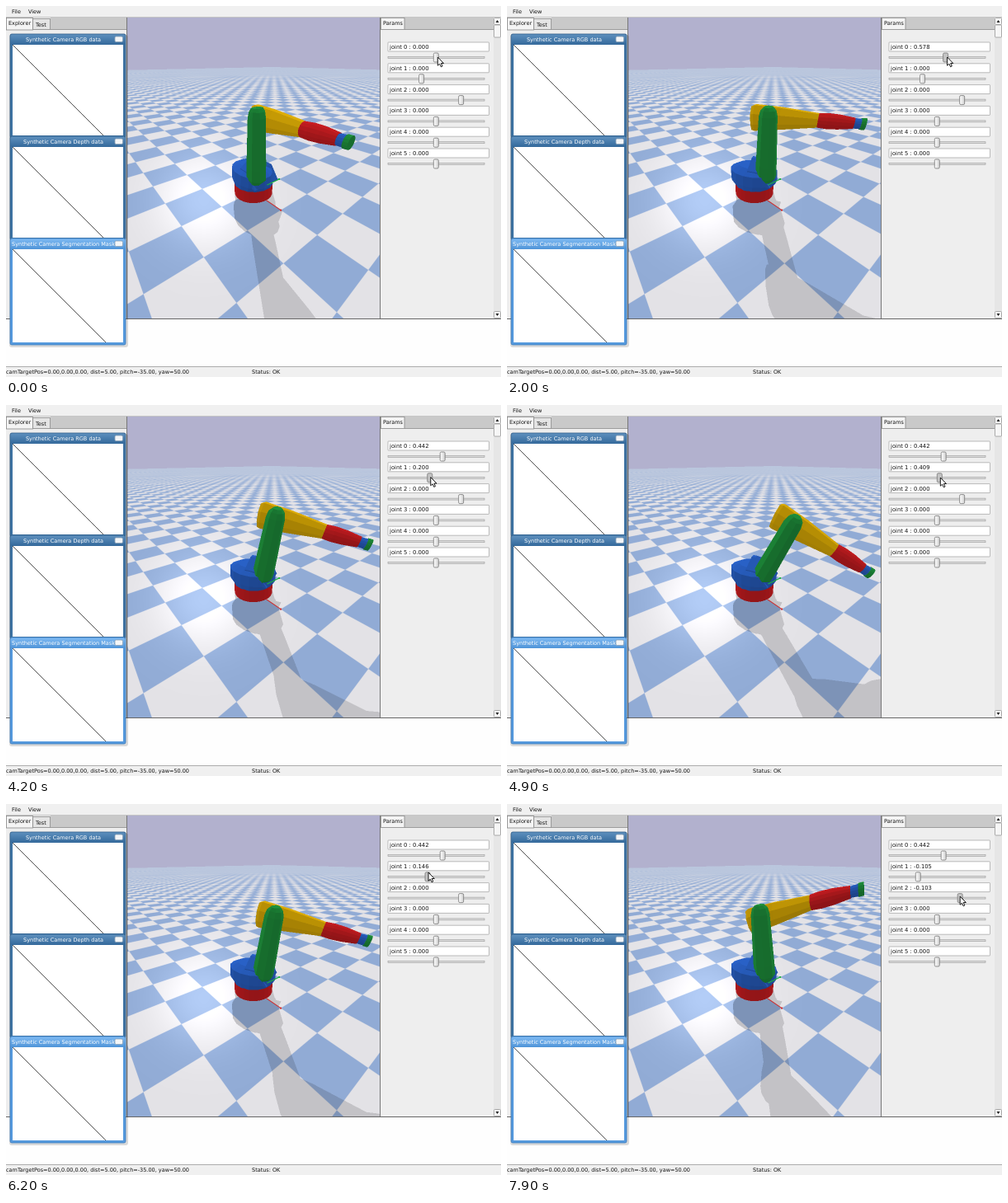
These frames come from a looping animation (600 px wide and 450 px high, 8 s). An HTML page with a canvas:

```html
<!DOCTYPE html>
<html lang="en">
<head>
<meta charset="utf-8">
<title>Robot arm joints</title>
<style>
html, body { margin: 0; width: 100%; height: 100%; overflow: hidden; background: #f0f0f0; }
canvas { position: absolute; left: 147px; top: 14px; width: 306px; height: 365px; }
svg { position: absolute; left: 0; top: 0; width: 600px; height: 450px; }
text { font: 6.5px "DejaVu Sans", sans-serif; fill: #111; }
</style>
</head>
<body>
<canvas id="view" width="612" height="730"></canvas>
<svg id="ui" viewBox="0 0 600 450">
  <defs>
    <linearGradient id="bar" x2="0" y2="1"><stop stop-color="#5d8fbd"/><stop offset="1" stop-color="#34699b"/></linearGradient>
    <linearGradient id="barOn" x2="0" y2="1"><stop stop-color="#7db9f2"/><stop offset="1" stop-color="#4f94d8"/></linearGradient>
    <linearGradient id="knob" x2="1" y2="0"><stop stop-color="#fff"/><stop offset="1" stop-color="#d2d2d2"/></linearGradient>
  </defs>
</svg>
<script>
const LOOP = 8000, STEP = 100;
const ui = document.getElementById('ui');

// ---------- interface ----------
function add(tag, attrs, label) {
  const el = document.createElementNS('http://www.w3.org/2000/svg', tag);
  for (const k in attrs) el.setAttribute(k, attrs[k]);
  if (label) el.textContent = label;
  ui.appendChild(el);
  return el;
}
const rect = (x, y, width, height, fill, more) => add('rect', { x, y, width, height, fill, ...more });
const line = (d, stroke, w = 1) => add('path', { d, stroke, fill: 'none', 'stroke-width': w });
const label = (x, y, s, more) => add('text', { x, y, ...more }, s);
const edge = (stroke, rx = 0) => ({ stroke, rx, 'stroke-width': .8 });

rect(0, 0, 600, 14, '#f0f0f0');
label(7, 9, 'File');
label(27, 9, 'View');
rect(0, 14, 147, 365, '#eeeeee');
rect(453, 14, 147, 365, '#eeeeee');
rect(54, 14, 92, 14, '#c9c9c9');
rect(483, 14, 108, 14, '#c9c9c9');
line('M0 13.5H600', '#b5b5b5', .7);
line('M146.5 14V379M453.5 14V379', '#777');
line('M53 28.5H146M483 28.5H591', '#888', .8);
rect(32.5, 15.5, 21, 13, '#e4e4e4', edge('#888'));
rect(454.5, 14.5, 28.5, 14, '#f4f4f4', edge('#888'));
rect(.5, 14.5, 32, 14.5, '#f4f4f4', edge('#888'));
label(3, 23, 'Explorer');
label(36, 24.5, 'Test');
label(457, 23, 'Params');
rect(0, 379, 600, 59, '#fefefe');
line('M0 379.5H600', '#555', .9);
rect(0, 437.5, 600, 12.5, '#f0f0f0');
line('M0 437.5H600', '#999', .8);
label(0, 446, 'camTargetPos=0.00,0.00,0.00, dist=5.00, pitch=-35.00, yaw=50.00');
label(298, 446, 'Status: OK');

rect(591, 14, 9, 365, '#e6e6e6');
rect(591.5, 14.5, 8, 8, '#f6f6f6', edge('#999', 1));
rect(591.5, 23, 8, 15, '#f6f6f6', edge('#999', 1));
rect(591.5, 370.5, 8, 8, '#f6f6f6', edge('#999', 1));
add('path', { d: 'M593.5 20L595.5 17L597.5 20ZM593.5 373L595.5 376L597.5 373Z', fill: '#222' });

function pane(y, h, name, active) {
  rect(5, y, 140, h + 16, active ? '#5599dd' : '#3f73a3', edge(active ? '#3d7cbc' : '#2d5a85', 2));
  rect(5.5, y + .5, 139, 12.5, active ? 'url(#barOn)' : 'url(#bar)', { rx: 2 });
  rect(8, y + 13, 134, h, '#fff');
  line(`M8 ${y + 13}l${h} ${h}`, '#222', .8);
  label(69.5, y + 8.8, name, { 'text-anchor': 'middle', style: 'fill:#fff' });
  rect(132, y + 3, 9.5, 6.5, '#f4f6f8', edge('#8fa3b5', 1.5));
}
rect(4, 35, 144, 379, '#000', { opacity: .14, rx: 3 });
pane(34, 110, 'Synthetic Camera RGB data');
pane(158, 110, 'Synthetic Camera Depth data');
pane(282, 113, 'Synthetic Camera Segmentation Mask', true);

const LIMITS = [[-3.228, 3.228], [-.785, 1.483], [-3.665, 1.134], [-1, 1], [-1, 1], [-1, 1]];
const rows = LIMITS.map((_, i) => {
  const y = 44 + 25.8 * i;
  rect(463, y, 122.5, 11, '#fff', edge('#aaa', .5));
  rect(463, y + 17.5, 117, 2, '#dcdcdc', { stroke: '#999', 'stroke-width': .6 });
  return {
    text: label(465, y + 8, '', { style: 'font-size:6.8px' }),
    knob: rect(0, y + 13, 6, 11, 'url(#knob)', edge('#777', 1.5))
  };
});
const pointer = add('path', {
  d: 'M0 0V10.2L2.3 8.2L4 11.8L5.7 11L4.1 7.5H7.2Z', fill: '#fff', stroke: '#000', 'stroke-width': .9
});

// ---------- motion ----------
// Smooth curve through [time, value] points, flat at its turning points.
function curve(keys) {
  const n = keys.length - 1;
  const slope = i => (keys[i + 1][1] - keys[i][1]) / (keys[i + 1][0] - keys[i][0]);
  const tangent = i => {
    if (i < 1 || i >= n) return 0;
    const a = slope(i - 1), b = slope(i);
    return a * b > 0 ? 2 * a * b / (a + b) : 0;
  };
  return t => {
    if (t <= keys[0][0]) return keys[0][1];
    if (t >= keys[n][0]) return keys[n][1];
    let i = 0;
    while (t > keys[i + 1][0]) i++;
    const [t0, a] = keys[i], [t1, b] = keys[i + 1], d = t1 - t0, u = (t - t0) / d, v = 1 - u;
    return a * v * v * (1 + 2 * u) + b * u * u * (3 - 2 * u) + d * u * v * (tangent(i) * v - tangent(i + 1) * u);
  };
}
const zero = () => 0;
const joints = [
  curve([[300, 0], [1200, -1.19], [1400, -1.4], [2000, .578], [2900, .442]]),
  curve([[3800, 0], [4700, .48], [4900, .409], [5500, -.25], [6200, .146], [6500, -.105]]),
  curve([[7000, 0], [7300, -.2], [7600, -.8], [7900, -.103], [8000, .1]]),
  zero, zero, zero
];
const LAG = 45; // the motors follow the sliders a little late
const toSecond = curve([[2900, 531], [3300, 510], [3500, 510], [3700, 505]]);
const toThird = curve([[6500, 499.5], [7000, 551.3]]);
const pointerY = curve([[300, 62], [2900, 62], [3300, 86], [4900, 88], [6200, 83], [6500, 84], [6950, 112]]);
const knobX = (i, v) => 463.8 + 115 * (v - LIMITS[i][0]) / (LIMITS[i][1] - LIMITS[i][0]);

function pointerX(t, q) {
  if (t < 2900) return knobX(0, q[0]) + 2;
  if (t < 3900) return toSecond(t);
  if (t < 6500) return knobX(1, q[1]) + 1;
  return t < 7000 ? toThird(t) : knobX(2, q[2]);
}

// ---------- camera ----------
const RAD = Math.PI / 180, SS = 2, W = 306 * SS, H = 365 * SS, FOCAL = 225, DIST = 5;
const cy = Math.cos(50 * RAD), sy = Math.sin(50 * RAD), cp = Math.cos(35 * RAD), sp = Math.sin(35 * RAD);
const LIGHT = [-.687, .464, .573];
const CAM = [sy * cp * DIST, -cy * cp * DIST, sp * DIST];

function project([x, y, z]) {
  const r = cy * x + sy * y, t = sy * x - cy * y, d = DIST - t * cp - z * sp;
  return [(153 + FOCAL * r / d) * SS, (211 - FOCAL * (z * cp - t * sp) / d) * SS, d];
}
function ground(px, py) {
  const u = (px - 300) / FOCAL, v = (225 - py) / FOCAL, down = sp - cp * v;
  if (down <= 0) return null;
  const s = sp * DIST / down, r = u * s, t = cp * DIST - s * (cp + sp * v);
  return [cy * r + sy * t, sy * r - cy * t];
}

// ---------- floor, baked once lit and once in shadow ----------
const lit = new Uint8ClampedArray(W * H * 4), shaded = new Uint8ClampedArray(W * H * 4);
const tri = x => 1 - Math.abs(((x % 2) + 2) % 2 - 1);
const wave = (x, w) => (tri(x + w / 2) - tri(x - w / 2)) / w;
const SKY = [178, 177, 206], BLUE_TILE = [145, 171, 213], WHITE_TILE = [227, 226, 230];

function bakeFloor() {
  for (let j = 0; j < H; j++) for (let i = 0; i < W; i++) {
    const px = 147 + (i + .5) / SS, py = 14 + (j + .5) / SS, k = (j * W + i) * 4;
    const p = ground(px, py);
    let color = SKY, glow = 0, dim = 1;
    if (p && Math.abs(p[0]) < 100 && Math.abs(p[1]) < 100) {
      const a = ground(px + .6, py), b = ground(px, py + .6);
      const w = n => Math.abs(a[n] - p[n]) + Math.abs(b[n] - p[n]);
      const m = .5 + .5 * wave(p[0], w(0)) * wave(p[1], w(1));
      color = BLUE_TILE.map((c, n) => c + (WHITE_TILE[n] - c) * m);
      glow = 34 * Math.exp(-((px - 240) ** 2 + (py - 235) ** 2) / 3300);
      dim = .86;
    }
    for (let n = 0; n < 3; n++) {
      lit[k + n] = color[n] + glow;
      shaded[k + n] = color[n] * dim;
    }
    lit[k + 3] = shaded[k + 3] = 255;
  }
}

// ---------- robot ----------
// Ring across an axis: 0 lies in y/z, 2 lies in x/y.
function ring(axis, at, c1, r1, c2, r2, n = 8) {
  const grow = 1 / Math.cos(Math.PI / n);
  return Array.from({ length: n }, (_, i) => {
    const a = (i + .5) * 2 * Math.PI / n;
    const u = c1 + r1 * grow * Math.cos(a), v = c2 + r2 * grow * Math.sin(a);
    return axis ? [u, v, at] : [at, u, v];
  });
}
const tube = (...ends) => ends.map(([x, r]) => ring(0, x, 0, r, -.054, r, 14));
const slab = (x0, x1, y, z) => [[x0, -y, z], [x1, -y, z], [x1, y, z], [x0, y, z]];
const RED = [206, 30, 34], BLUE = [42, 98, 200], GREEN = [32, 148, 62], YELLOW = [226, 176, 6];

// level: 0 base, 1 turret, 2 upper arm, 3 forearm
const parts = [
  { level: 0, color: RED, rings: [ring(2, 0, 0, .5, 0, .5, 24), ring(2, .34, 0, .49, 0, .49, 24)] },
  { level: 1, color: BLUE, rings: [
    ring(2, .33, 0, .5, 0, .49, 16), ring(2, .46, 0, .58, -.06, .44, 16),
    ring(2, .72, 0, .57, -.06, .42, 16), ring(2, .82, 0, .38, -.04, .24, 16)] },
  { level: 1, color: BLUE, rings: [slab(-.06, .5, .38, .45), slab(-.06, .26, .36, .8), slab(-.05, .05, .05, 1)] },
  { level: 2, color: GREEN, rings: [[-.22, .14, .15], [-.08, .23, .21], [.2, .22, .21], [1.25, .17, .17], [1.36, .14, .15], [1.42, .08, .12]]
    .map(([z, rx, ry]) => ring(2, z, 0, rx, -.21, ry)) },
  { level: 3, color: YELLOW, rings: [[-.43, .08, .13, -.13, .24], [-.36, .08, .16, -.12, .26], [.2, .06, .15, -.09, .21], [.95, 0, .12, -.054, .12]]
    .map(([x, c, r, cz, rz]) => ring(0, x, c, r, cz, rz)) },
  { level: 3, color: RED, rings: tube([.93, .13], [1.1, .14], [1.3, .13], [1.56, .095]) },
  { level: 3, color: BLUE, rings: tube([1.5, .085], [1.68, .09]) },
  { level: 3, color: GREEN, rings: tube([1.67, .1], [1.75, .1]) }
];

const turnY = ([x, y, z], a) => [x * Math.cos(a) + z * Math.sin(a), y, z * Math.cos(a) - x * Math.sin(a)];
const turnZ = ([x, y, z], a) => [x * Math.cos(a) - y * Math.sin(a), x * Math.sin(a) + y * Math.cos(a), z];
function place(p, level, q) {
  if (level > 2) { p = turnY(p, q[2]); p[2] += 1.25; }
  if (level > 1) { p = turnY(p, q[1]); p[0] += .35; p[2] += .75; }
  return level ? turnZ(p, q[0]) : p;
}
const sub = (a, b) => a.map((v, i) => v - b[i]);
const dot = (a, b) => a[0] * b[0] + a[1] * b[1] + a[2] * b[2];
const cross = (a, b) => [a[1] * b[2] - a[2] * b[1], a[2] * b[0] - a[0] * b[2], a[0] * b[1] - a[1] * b[0]];
const castShadow = ([x, y, z]) => [x - LIGHT[0] / LIGHT[2] * z, y - LIGHT[1] / LIGHT[2] * z, 0];

function faces(rings) {
  const out = [rings[0], rings[rings.length - 1]];
  for (let k = 1; k < rings.length; k++) {
    const a = rings[k - 1], b = rings[k], n = a.length;
    for (let i = 0; i < n; i++) out.push([a[i], a[(i + 1) % n], b[(i + 1) % n], b[i]]);
  }
  return out;
}

// Calls put(pixel, 1 / depth) for each pixel of a flat polygon.
function fill(points, put) {
  const s = points.map(project);
  if (s.some(p => p[2] < .25)) return;
  for (let k = 2; k < s.length; k++) {
    const [a, b, c] = [s[0], s[k - 1], s[k]];
    const area = (b[0] - a[0]) * (c[1] - a[1]) - (b[1] - a[1]) * (c[0] - a[0]);
    if (Math.abs(area) < 1e-6) continue;
    const x0 = Math.max(0, Math.floor(Math.min(a[0], b[0], c[0]))), x1 = Math.min(W - 1, Math.max(a[0], b[0], c[0]));
    const y0 = Math.max(0, Math.floor(Math.min(a[1], b[1], c[1]))), y1 = Math.min(H - 1, Math.max(a[1], b[1], c[1]));
    for (let y = y0; y <= y1; y++) for (let x = x0; x <= x1; x++) {
      const dx = x + .5 - a[0], dy = y + .5 - a[1];
      const v = (dx * (c[1] - a[1]) - dy * (c[0] - a[0])) / area;
      const w = (dy * (b[0] - a[0]) - dx * (b[1] - a[1])) / area;
      if (v >= 0 && w >= 0 && v + w <= 1) put(y * W + x, (1 - v - w) / a[2] + v / b[2] + w / c[2]);
    }
  }
}

const ctx = document.getElementById('view').getContext('2d');
const image = ctx.createImageData(W, H), pixels = new Uint32Array(image.data.buffer);
const shadedPixels = new Uint32Array(shaded.buffer), near = new Float32Array(W * H);

function drawAxis(dir, color) {
  const a = project(dir.map(v => v * .5)), b = project(dir);
  ctx.strokeStyle = ctx.fillStyle = color;
  ctx.lineWidth = 2;
  ctx.beginPath();
  ctx.moveTo(a[0], a[1]);
  ctx.lineTo(b[0], b[1]);
  ctx.stroke();
  ctx.fillRect(b[0] - 2, b[1] - 2, 4, 4);
}

function drawScene(q) {
  image.data.set(lit);
  near.fill(0);
  const solid = [];
  for (const { level, color, rings } of parts) {
    for (const f of faces(rings.map(r => r.map(p => place(p, level, q))))) solid.push([f, color]);
  }
  for (const [f] of solid) fill(f.map(castShadow), i => { pixels[i] = shadedPixels[i]; });
  for (const [f, color] of solid) {
    const n = cross(sub(f[1], f[0]), sub(f[2], f[0]));
    const flip = dot(n, sub(CAM, f[0])) < 0 ? -1 : 1;
    const shade = .88 + .2 * flip * dot(n, LIGHT) / (Math.hypot(...n) || 1);
    const [r, g, b] = color.map(c => Math.min(255, c * shade));
    const value = (255 << 24 | b << 16 | g << 8 | r) >>> 0;
    fill(f, (i, z) => { if (z > near[i]) { near[i] = z; pixels[i] = value; } });
  }
  ctx.putImageData(image, 0, 0);
  drawAxis([1, 0, 0], '#d02828');
  drawAxis([0, 1, 0], '#1cb43c');
}

// ---------- playback ----------
function draw(t) {
  const q = joints.map(f => f(t));
  drawScene(joints.map(f => f(t - LAG)));
  const active = t < 3000 ? 0 : t < 3300 ? -1 : t < 6600 ? 1 : t < 7000 ? -1 : 2;
  rows.forEach(({ text, knob }, i) => {
    text.textContent = `joint ${i} : ${q[i].toFixed(3).replace('-0.000', '0.000')}`;
    knob.setAttribute('x', knobX(i, q[i]) - 3);
    knob.setAttribute('fill', i === active && t >= 300 ? '#c4c4c4' : 'url(#knob)');
  });
  pointer.setAttribute('transform', `translate(${pointerX(t, q)} ${pointerY(t)})`);
}

bakeFloor();
let shown = -1, start = performance.now();
function tick() {
  const t = Math.floor((performance.now() - start) % LOOP / STEP) * STEP;
  if (t !== shown) draw(shown = t);
  requestAnimationFrame(tick);
}
draw(0);
tick();
</script>
</body>
</html>
```
